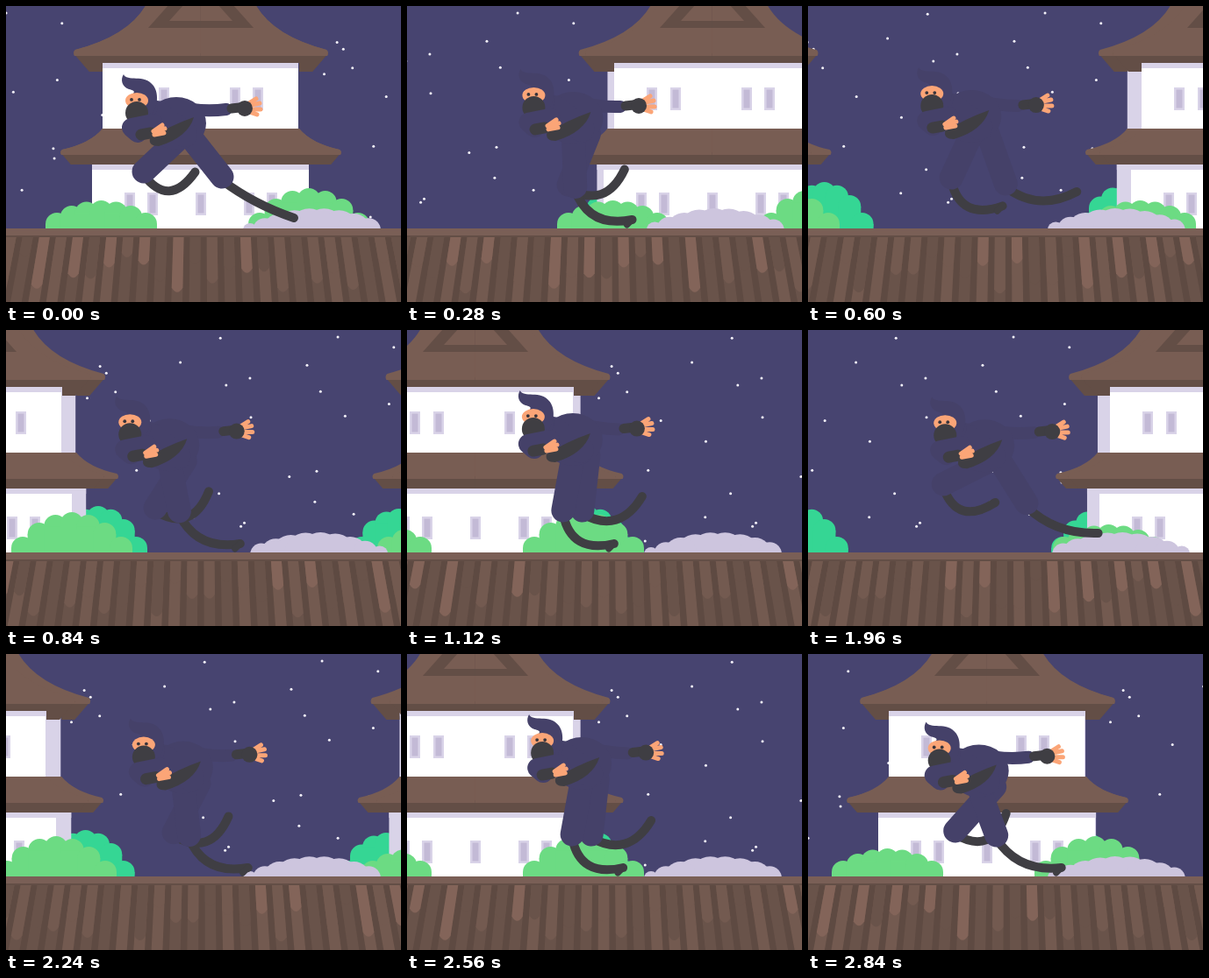
These frames come from a looping animation (450x338 px, 2880 ms). An HTML page with a canvas:

```html
<!DOCTYPE html>
<html lang="en">
<head>
<meta charset="utf-8">
<title>Running ninja</title>
<style>
html, body { margin: 0; width: 100%; height: 100%; overflow: hidden; background: #474470; }
canvas { display: block; width: 450px; height: 338px; }
</style>
</head>
<body>
<canvas id="stage" width="450" height="338"></canvas>
<script>
const ctx = document.getElementById('stage').getContext('2d');
const LOOP = 2880, LAP = 1440, STRIDE = 480, FRAME = 40;
const SPAN = 648, MID = 222, GROUND = 254, TAU = 2 * Math.PI;
const C = {
  sky: '#474470', suit: '#454169', dark: '#3f3e43', skin: '#fba577', eye: '#37343c',
  roof: '#785d53', eave: '#634e46', wall: '#ffffff', shade: '#d9d3e8', pane: '#c3bad6',
  leaf: '#6cdb83', deepLeaf: '#35d694', dust: '#cdc5de',
  beam: '#7a5f56', gap: '#5e4a42', tiles: ['#69534a', '#735a50', '#836459']
};

// One leg over two strides: knee and foot positions at the main poses.
const legPoses = [
  { at: 0, knee: [246, 195], foot: [328, 242] },
  { at: 120, knee: [233, 203], foot: [314, 212] },
  { at: 160, knee: [205, 206], foot: [273, 190] },
  { at: 440, knee: [167, 202], foot: [225, 182] },
  { at: 520, knee: [147, 176], foot: [206, 197] },
  { at: 640, knee: [183, 206], foot: [241, 244] },
  { at: 920, knee: [214, 207], foot: [288, 244] }
];

function randomFrom(seed) {
  return () => (seed = (seed * 16807) % 2147483647) / 2147483647;
}
const rand = randomFrom(77);

const STAR_COLS = 12, STAR_ROWS = 4;
const stars = Array.from({ length: STAR_COLS * STAR_ROWS }, (_, i) => [
  (i % STAR_COLS + rand()) * SPAN / STAR_COLS,
  (Math.floor(i / STAR_COLS) + rand()) * 250 / STAR_ROWS
]);

const COLUMNS = 34;
const tileColumns = Array.from({ length: COLUMNS }, (_, i) => ({
  upper: C.tiles[(i + 1) % 2 + (rand() < .4 ? 1 : 0)],
  lower: C.tiles[Math.floor(rand() * 2)],
  end: 280 + rand() * 45
}));

const mix = (a, b, f) => a.map((v, i) => v + (b[i] - v) * f);

function fill(color, d) {
  ctx.fillStyle = color;
  ctx.fill(new Path2D(d));
}
function rect(color, x, y, w, h) {
  ctx.fillStyle = color;
  ctx.fillRect(x, y, w, h);
}
function oval(color, x, y, rx, ry = rx) {
  ctx.fillStyle = color;
  ctx.beginPath();
  ctx.ellipse(x, y, rx, ry, 0, 0, TAU);
  ctx.fill();
}
function limb(color, width, d) {
  ctx.strokeStyle = color;
  ctx.lineWidth = width;
  ctx.lineCap = ctx.lineJoin = 'round';
  ctx.stroke(new Path2D(d));
}
function shifted(x, y, draw) {
  ctx.save();
  ctx.translate(x, y);
  draw();
  ctx.restore();
}
function mirrored(draw) {
  draw();
  ctx.save();
  ctx.translate(2 * MID, 0);
  ctx.scale(-1, 1);
  draw();
  ctx.restore();
}

function bush(color, left, right, height) {
  const lumps = 7, r = 13;
  for (let i = 0; i < lumps; i++) {
    const q = i / (lumps - 1);
    const x = left + r + (right - left - 2 * r) * q;
    const y = GROUND - 5 - (height - r - 5) * Math.sin(Math.PI * q) ** .8;
    oval(color, x, y, r);
    rect(color, x - r, y, 2 * r, GROUND - y);
  }
}

function wall(x, y, w, h, front) {
  rect(front ? C.wall : C.shade, x, y, w, h);
  rect(C.shade, x, y, w, 6);
}

function walls(front) {
  wall(98, 181, 247, 75, front);
  wall(110, 65, 223, 77, front);
}

function windowAt(x, y) {
  rect(C.shade, x, y, 12, 26);
  rect(C.pane, x + 2.5, y + 2.5, 7, 21);
}

function roofs() {
  mirrored(() => {
    fill(C.eave, 'M77 54L95 75H110V65H222.5V54Z');
    fill(C.roof, 'M160 -2Q140 34 79 50Q76 52 78 57H222.5V-2Z');
    fill(C.eave, 'M62 167L74 181H222.5V167Z');
    fill(C.roof, 'M110 140Q96 157 64 164Q61 166 63 170H222.5V140Z');
  });
}

function gable() {
  mirrored(() => {
    fill(C.eave, 'M186 -2L162 25H222.5V-2Z');
    fill(C.roof, 'M203 -2L186 17H222.5V-2Z');
  });
}

function scenery(x) {
  for (const [sx, sy] of stars) oval('#f4f2fa', sx, sy, 1.5);
  // Rear parts lag behind, so the side of the house shows off-centre.
  shifted(-.2 * x, 0, () => {
    bush(C.deepLeaf, 90, 200, 50);
    bush(C.deepLeaf, 265, 377, 53);
  });
  shifted(-.06 * x, 0, () => {
    walls(false);
    roofs();
  });
  walls(true);
  for (const wx of [147, 174, 255, 281]) windowAt(wx, 93);
  for (const wx of [135, 161, 216, 271, 297]) windowAt(wx, 213);
  roofs();
  gable();
  bush(C.leaf, 45, 172, 32);
  bush(C.leaf, 276, 414, 46);
}

function dust(t) {
  const count = 9;
  for (let i = 0; i < count; i++) {
    const q = (t / STRIDE + i / count) % 1;
    const size = 8 + 17 * Math.sin(Math.PI * q);
    oval(C.dust, 278 + 152 * q, GROUND + 2, size);
  }
}

function rooftop(offset) {
  const pitch = SPAN / COLUMNS, top = 262, bottom = 340;
  const fan = (x, y) => 225 + (x - 225) * (1 + .07 * (y - top) / (bottom - top));
  const strip = (color, x, w, end) =>
    fill(color, `M${fan(x, top)} ${top}L${fan(x + w, top)} ${top}L${fan(x + w, end)} ${end}` +
      `Q${fan(x + w / 2, end)} ${end + 10} ${fan(x, end)} ${end}Z`);
  rect(C.gap, 0, GROUND, 450, 84);
  for (let i = -COLUMNS; i < COLUMNS; i++) {
    const x = i * pitch + offset;
    if (x < -20 || x > 455) continue;
    const column = tileColumns[(i + COLUMNS) % COLUMNS];
    strip(column.lower, x, 12, bottom);
    strip(column.upper, x, 12, column.end);
  }
  rect(C.beam, 0, GROUND, 450, 9);
  rect(C.eave, 0, 262, 450, 2);
}

function legPose(u) {
  const i = legPoses.findLastIndex(p => p.at <= u);
  const a = legPoses[i], b = legPoses[(i + 1) % legPoses.length];
  const f = (u - a.at) / ((b.at || 2 * STRIDE) - a.at);
  return [mix(a.knee, b.knee, f), mix(a.foot, b.foot, f)];
}

function leg(u, hipX, hipY) {
  const [[kx, ky], [fx, fy]] = legPose(u);
  // A shin of fixed length bows more the closer foot and knee come.
  const dx = fx - kx, dy = fy - ky, chord = Math.hypot(dx, dy);
  const sag = .55 * Math.sqrt(Math.max(0, 96 ** 2 - chord ** 2)) / chord;
  limb(C.dark, 10, `M${kx} ${ky + 4}Q${kx + dx / 2 - dy * sag} ${ky + dy / 2 + dx * sag} ${fx} ${fy}`);
  if (u >= 600 && u < 940) limb(C.dark, 7, `M${fx} ${fy}l-6 6`);
  limb(C.suit, 27, `M${hipX} ${hipY}L${kx} ${ky}`);
}

function farHand() {
  limb(C.dark, 11, 'M257 117L266 116');
  limb(C.skin, 5, 'M274 113L285 106M275 114L289 111M275 118L290 118M274 120L286 124');
  oval(C.dark, 272, 117, 9);
}

function torso() {
  oval(C.suit, 194, 134, 34, 30);
  limb(C.suit, 30, 'M172 123L203 146');
  fill(C.dark, 'M214 127Q188 136 164 151Q162 160 174 160Q207 150 214 127Z');
}

function head() {
  oval(C.suit, 156, 114, 17);
  fill(C.suit, 'M134 78C137 87 158 77 168 91C175 101 172 116 166 124L139 106C148 98 148 97 140 95C132 92 130 84 134 78Z');
  oval(C.skin, 149, 108, 13, 9);
  oval(C.dark, 149, 122, 13);
  oval(C.eye, 143, 107, 1.9);
  oval(C.eye, 152, 107, 1.9);
}

function nearArm(reach) {
  limb(C.suit, 22, 'M168 134L143 139L150 145');
  shifted(reach, 0, () => {
    limb(C.dark, 13, 'M154 147L165 145');
    limb(C.skin, 5, 'M168 143L178 136M169 144L181 140M169 147L180 145');
  });
}

function ninja(t) {
  const phase = t % STRIDE;
  const hop = (((phase - 20 + STRIDE) % STRIDE) / STRIDE) ** .6;
  const dy = -4.5 * (1 - Math.cos(TAU * hop));
  const reach = .55 * dy;
  shifted(-8 * Math.sin(TAU * t / LOOP), 0, () => {
    leg(phase, 212, 152 + dy);
    limb(C.suit, 14, `M192 ${114 + dy}Q222 ${122 + dy} ${251 + reach} ${118 + dy / 2}`);
    shifted(reach, dy / 2, farHand);
    leg(phase + STRIDE, 194, 154 + dy);
    shifted(0, dy, () => {
      torso();
      head();
      nearArm(reach);
    });
  });
}

function draw(now) {
  const t = Math.floor(now % LOOP / FRAME) * FRAME;
  const offset = SPAN * (t % LAP) / LAP;
  rect(C.sky, 0, 0, 450, 338);
  for (const x of [offset - SPAN, offset]) shifted(x, 0, () => scenery(x));
  dust(t);
  rooftop(offset);
  ninja(t);
}

const start = performance.now();
function tick() {
  draw(performance.now() - start);
  requestAnimationFrame(tick);
}
tick();
</script>
</body>
</html>
```
